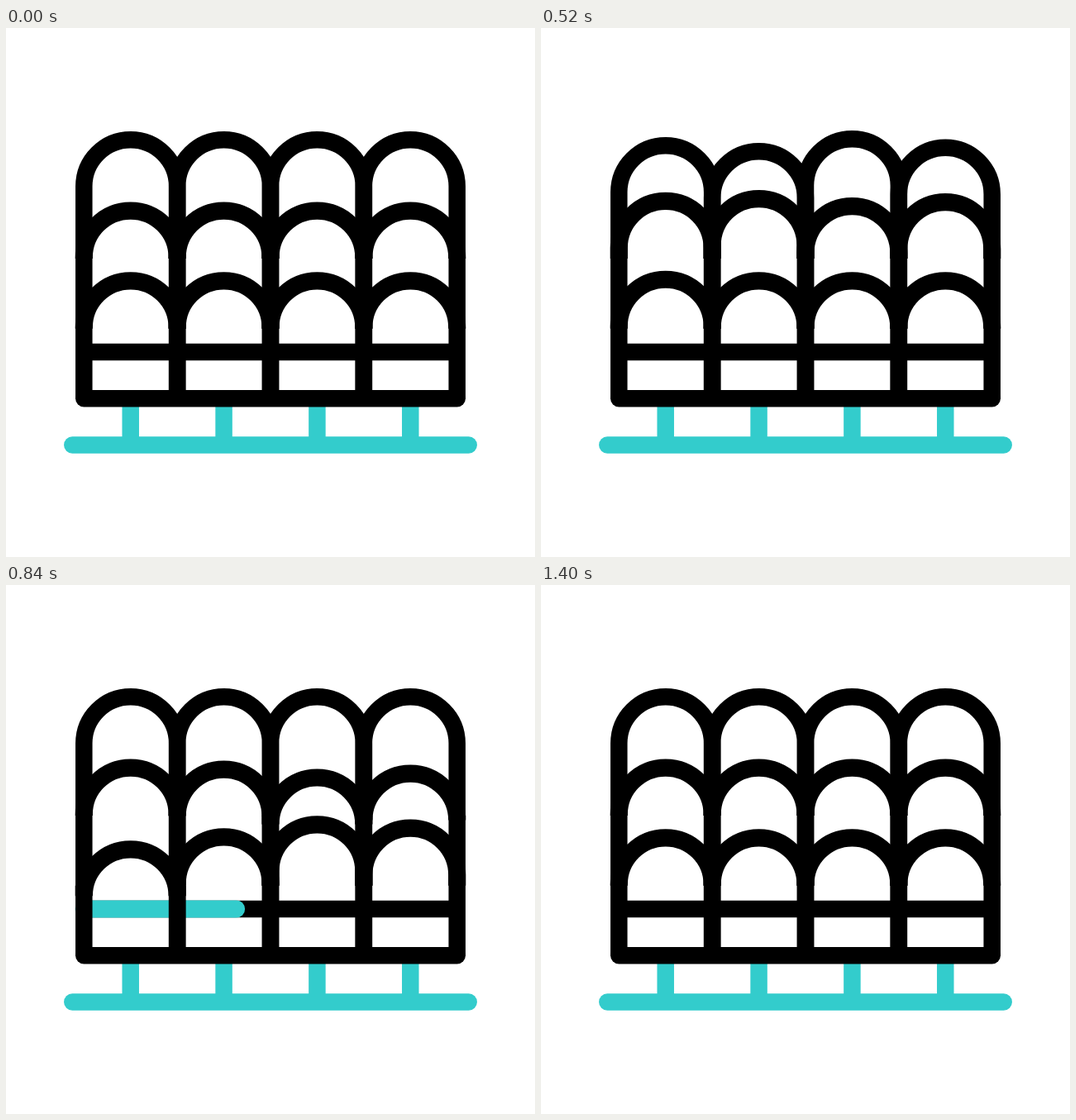
An HTML page with a canvas for the animation above (1480 ms loop, 640 by 640 pixels).

```html
<!DOCTYPE html>
<html lang="en">
<head>
<meta charset="utf-8">
<title>Seats</title>
<style>
html, body { margin: 0; height: 100%; overflow: hidden; background: #fff; }
canvas { display: block; }
</style>
</head>
<body>
<canvas id="stage" width="640" height="640"></canvas>
<script>
const ctx = document.getElementById('stage').getContext('2d');
const LOOP = 1480, STEP = 40, LAST = 1400;
const BLACK = '#000', TEAL = '#33cccc';
const LEFT = 94.3, RIGHT = 545.7, PITCH = (RIGHT - LEFT) / 4, RADIUS = PITCH / 2;
const FLOOR = 448.3, BAR = 392, LINE = 20.5;
const springs = [191.6, 277.5, 362.2];
const columnDelays = [0, 80, 160, 120];
const ROW_DELAY = 200;

// Sine ease in and out from 0 to 1 between two times
function ease(t, from, to) {
  const p = Math.min(1, Math.max(0, (t - from) / (to - from)));
  return (1 - Math.cos(Math.PI * p)) / 2;
}

// Rise, drop past the rest position, settle
const hop = t => -16 * ease(t, 80, 280) + 30 * ease(t, 280, 440) - 14 * ease(t, 440, 600);

function line(x1, y1, x2, y2, color, width = LINE, cap = 'butt') {
  ctx.strokeStyle = color;
  ctx.lineWidth = width;
  ctx.lineCap = cap;
  ctx.beginPath();
  ctx.moveTo(x1, y1);
  ctx.lineTo(x2, y2);
  ctx.stroke();
}

function arch(x, foot, spring, width) {
  ctx.strokeStyle = BLACK;
  ctx.lineWidth = width;
  ctx.lineCap = 'butt';
  ctx.beginPath();
  ctx.moveTo(x - RADIUS, foot);
  ctx.lineTo(x - RADIUS, spring);
  ctx.arc(x, spring, RADIUS, Math.PI, 0);
  ctx.lineTo(x + RADIUS, foot);
  ctx.stroke();
}

function draw(t) {
  ctx.fillStyle = '#fff';
  ctx.fillRect(0, 0, 640, 640);

  const centers = columnDelays.map((_, i) => LEFT + RADIUS + i * PITCH);
  centers.forEach(x => line(x, FLOOR, x, 504.5, TEAL));
  line(80.3, 504.5, 559.7, 504.5, TEAL, LINE, 'round');

  line(LEFT, BAR, RIGHT, BAR, BLACK);
  const span = RIGHT - LEFT;
  const head = LEFT + span * ease(t, 540, 1220);
  const tail = LEFT + span * ease(t, 912, 1406);
  if (head - tail > 0.5) line(tail, BAR, head, BAR, TEAL, 21.2, 'round');

  springs.forEach((rest, row) => centers.forEach((x, col) => {
    const spring = rest + hop(t - row * ROW_DELAY - columnDelays[col]);
    arch(x, row ? rest + 1.5 : FLOOR, spring, row ? 21.2 : LINE);
  }));
  line(LEFT, FLOOR, RIGHT, FLOOR, BLACK, LINE, 'round');
}

const start = performance.now();
function frame() {
  const t = (performance.now() - start) % LOOP;
  draw(Math.min(LAST, Math.floor(t / STEP) * STEP));
  requestAnimationFrame(frame);
}
frame();
</script>
</body>
</html>
```
